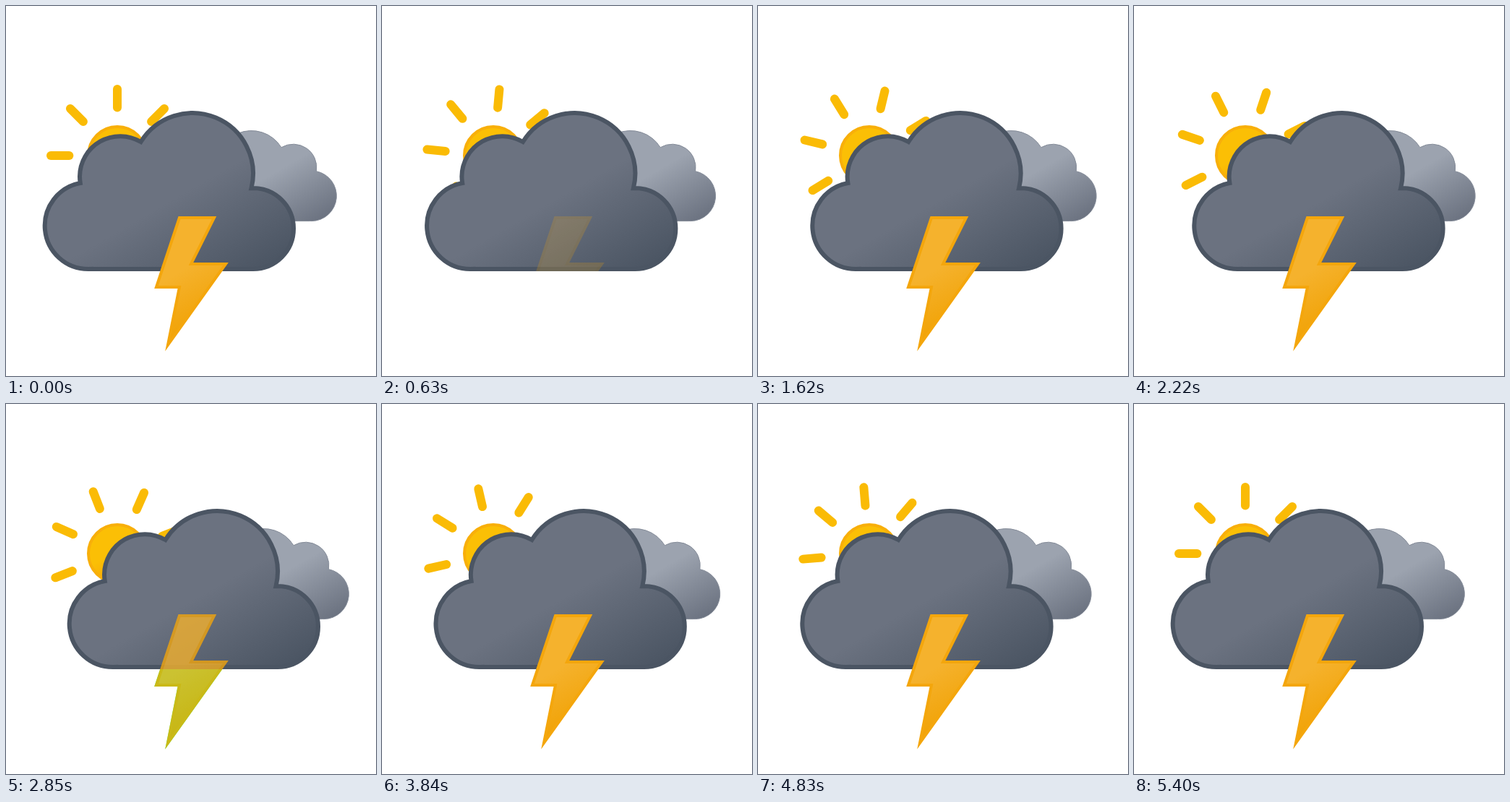
These frames come from a looping animation (512x512 px, 5.43 s). An HTML page:

```html
<!DOCTYPE html>
<html lang="en">
<head>
<meta charset="utf-8">
<title>Thunderstorm</title>
<style>
  html, body { margin: 0; width: 100%; height: 100%; overflow: hidden; background: #fff; }
  svg { display: block; width: 100vw; height: 100vh; }
</style>
</head>
<body>
<svg viewBox="0 0 512 512">
  <defs>
    <linearGradient id="sunFill" gradientUnits="userSpaceOnUse" x1="-20" y1="-34.6" x2="20" y2="34.7">
      <stop offset=".45" stop-color="#fbbf05"/>
      <stop offset="1" stop-color="#f5a005"/>
    </linearGradient>
    <linearGradient id="backFill" gradientUnits="userSpaceOnUse" x1="52.7" y1="9.6" x2="133.4" y2="149.3">
      <stop offset=".45" stop-color="#9ca3af"/>
      <stop offset="1" stop-color="#6b7280"/>
    </linearGradient>
    <linearGradient id="frontFill" gradientUnits="userSpaceOnUse" x1="99.5" y1="30.7" x2="232.6" y2="261.4">
      <stop offset=".45" stop-color="#6b7280"/>
      <stop offset="1" stop-color="#4b5563"/>
    </linearGradient>
    <linearGradient id="boltFill" gradientUnits="userSpaceOnUse" x1="8.7" y1="17.1" x2="80.9" y2="142.1">
      <stop offset=".45" stop-color="#f5b22d"/>
      <stop offset="1" stop-color="#f1a205"/>
    </linearGradient>
    <clipPath id="aboveBase"><rect width="512" height="367"/></clipPath>
    <path id="boltShape" stroke-width="4" stroke-miterlimit="10" d="m34.8 2-32 96h32l-16 80 80-112h-48l32-64z"/>
  </defs>

  <g transform="translate(154 207)">
    <circle r="40" fill="url(#sunFill)" stroke="#f8af0a" stroke-width="4"/>
    <g id="rays" stroke="#fabb05" stroke-width="12" stroke-linecap="round"></g>
  </g>

  <path id="back" fill="url(#backFill)" stroke="#848b98" d="M.5 93.2a32.4 32.4 0 0 0 32.4 32.4h129.8v-.1l2.3.1a34.8 34.8 0 0 0 6.5-68.9 32.4 32.4 0 0 0-48.5-33 48.6 48.6 0 0 0-88.6 37.1h-1A32.4 32.4 0 0 0 .5 93.1Z"/>

  <!-- Tints the fading bolt below the cloud -->
  <use id="tint" href="#boltShape" x="205.2" y="291" fill="#3f4" stroke="#3f4"/>

  <path id="front" fill="url(#frontFill)" stroke="#4b5563" stroke-width="6" stroke-miterlimit="10" d="m291 107-2.5.1A83.9 83.9 0 0 0 135.6 43 56 56 0 0 0 51 91a56.6 56.6 0 0 0 .8 9A60 60 0 0 0 63 219l4-.2v.2h224a56 56 0 0 0 0-112Z"/>

  <g id="bolt">
    <use href="#boltShape" x="205.2" y="291" fill="url(#boltFill)" stroke="#f4a60c"/>
  </g>
</svg>
<script>
  const STEP = 30, STEPS = 181;
  // Bolt opacity: [progress, value]
  const FLICKER = [[0, 1], [.38, 1], [.5, 0], [.63, 1], [.75, 0], [.86, 1], [.94, 0], [1, 1]];
  const FLICKER_TIME = 1.33, FLICKER_PERIOD = 2;

  const get = id => document.getElementById(id);
  const rays = get('rays'), back = get('back'), front = get('front');
  const bolt = get('bolt'), tint = get('tint');

  for (let i = 0; i < 8; i++) {
    const ray = document.createElementNS('http://www.w3.org/2000/svg', 'path');
    ray.setAttribute('d', 'M0-66.6V-92');
    ray.setAttribute('transform', `rotate(${i * 45})`);
    rays.append(ray);
  }

  function boltOpacity(seconds) {
    const p = (seconds % FLICKER_PERIOD) / FLICKER_TIME;
    if (p >= 1) return 1;
    const i = FLICKER.findIndex(([at]) => at > p);
    const [p0, v0] = FLICKER[i - 1], [p1, v1] = FLICKER[i];
    return v0 + (v1 - v0) * (p - p0) / (p1 - p0);
  }

  function draw(now) {
    const step = Math.floor(now / STEP) % STEPS;
    const u = step / (STEPS - 1);
    const sway = 1 - Math.abs(2 * u - 1);
    const alpha = boltOpacity(step / 30);
    const whole = alpha >= .5;

    rays.setAttribute('transform', `rotate(${45 * u})`);
    back.setAttribute('transform', `translate(${258 + 18 * sway} 172)`);
    front.setAttribute('transform', `translate(${51 + 36 * sway} 145)`);
    bolt.setAttribute('opacity', alpha);
    // When faint, the bolt shows only against the cloud
    bolt.setAttribute('clip-path', whole ? 'none' : 'url(#aboveBase)');
    tint.setAttribute('visibility', whole && alpha < 1 ? 'visible' : 'hidden');
  }

  function tick() {
    draw(performance.now());
    requestAnimationFrame(tick);
  }
  tick();
</script>
</body>
</html>
```
